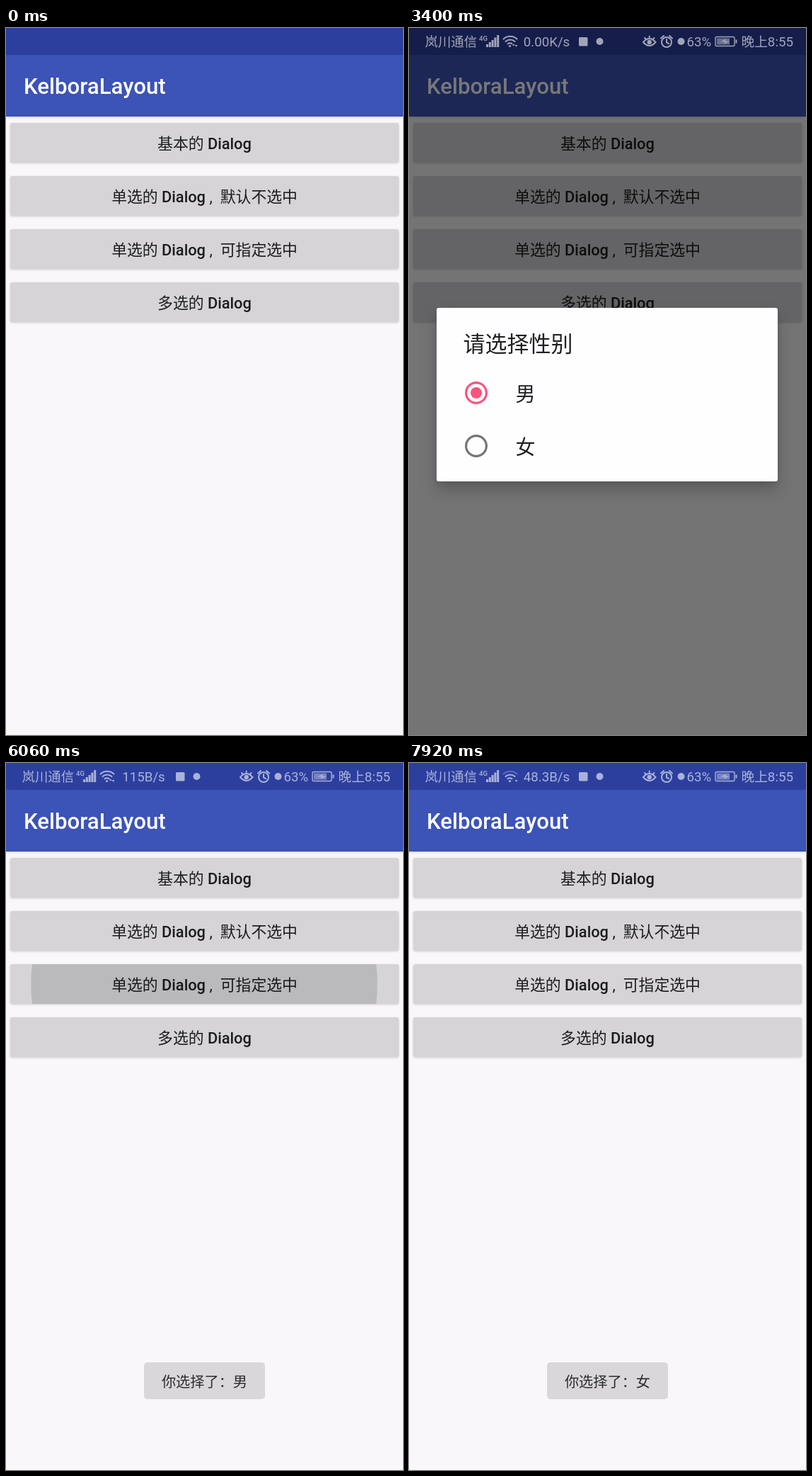
Animation of 561x998 px, one loop 8000 ms. Source, as an HTML page:

```html
<!DOCTYPE html>
<html lang="zh-CN">
<head>
<meta charset="utf-8">
<title>Dialog</title>
<style>
html, body { margin: 0; width: 100%; height: 100%; overflow: hidden; background: #f9f7fa; }
svg { display: block; width: 100%; height: 100%; }
text { font-family: Roboto, "Noto Sans CJK SC", "Noto Sans CJK", sans-serif; }
.medium { font-weight: 500; }
.mid { text-anchor: middle; }
#bar { filter: drop-shadow(0 1px 1.5px rgba(0,0,0,.18)); }
#buttons rect { fill: #d6d4d7; filter: drop-shadow(0 1px 1.5px rgba(0,0,0,.18)); }
#buttons text { font-size: 21.8px; fill: #1c1b1d; }
#panel { filter: drop-shadow(0 12px 11px rgba(0,0,0,.2)) drop-shadow(0 2px 3px rgba(0,0,0,.1)); }
#status { font-size: 18.7px; fill: #fff; }
.line { fill: none; stroke: #fff; stroke-width: 2; stroke-linecap: round; }
</style>
</head>
<body>
<svg viewBox="0 0 561 998">
  <defs>
    <clipPath id="buttonClip"><rect x="6" y="284" width="549" height="56" rx="3"/></clipPath>
    <clipPath id="rowClip"><rect id="row" x="39" width="482" height="75"/></clipPath>
  </defs>

  <rect width="561" height="998" fill="#f9f7fa"/>
  <rect id="bar" y="38" width="561" height="87" fill="#3c53b7"/>
  <rect width="561" height="38" fill="#2c3f9f"/>
  <text x="25" y="93" font-size="31.2" fill="#fff" class="medium">KelboraLayout</text>
  <g id="buttons"></g>
  <g clip-path="url(#buttonClip)"><circle id="buttonRipple" cx="280" cy="312"/></g>

  <rect id="dim" width="561" height="998"/>

  <g id="dialog">
    <rect id="panel" x="39" y="395" width="482" height="245" rx="3" fill="#fefdff"/>
    <g clip-path="url(#rowClip)"><circle id="rowRipple" opacity=".1"/></g>
    <g fill="#212121">
      <text x="76.5" y="456.5" font-size="31">请选择性别</text>
      <text x="150.5" y="526.5" font-size="28">男</text>
      <text x="150.5" y="601.5" font-size="28">女</text>
    </g>
    <g fill="none" stroke-width="3.2">
      <circle cx="95" cy="515" r="14.4" stroke="#f9547f"/>
      <circle cx="95" cy="590" r="14.4" stroke="#757575"/>
    </g>
    <circle cx="95" cy="515" r="8" fill="#f9547f"/>
  </g>

  <g id="toast">
    <rect x="195" y="846" width="171" height="52" rx="5" fill="#d8d6d9" opacity=".97"/>
    <text id="message" x="280.5" y="880.5" font-size="20.2" fill="#2a292b" class="mid"></text>
  </g>

  <g id="status">
    <text x="22.5" y="26" font-size="18.4">岚川通信</text>
    <text x="99" y="18" font-size="9.5" class="medium">4G</text>
    <path d="M109 23h3v4h-3zM112.8 20h3v7h-3zM116.6 17h3v10h-3zM120.4 13.5h3v13.5h-3zM124.2 10h3v17h-3z"/>
    <path id="outerArc" class="line" d="M133.5 15.5a14 14 0 0 1 19 0"/>
    <path class="line" d="M136.5 19a9.5 9.5 0 0 1 13 0M139.5 22.3a5 5 0 0 1 6 0"/>
    <circle cx="142.5" cy="25.5" r="1.6"/>
    <path id="arrowUp" d="M146 25l1.8-3 1.8 3z"/>
    <path d="M149.8 24h3.6l-1.8 3z"/>
    <text id="rate" x="194.5" y="26" class="mid"></text>
    <rect x="240" y="13" width="12.5" height="12.5" rx="1.5"/>
    <circle cx="269.5" cy="19" r="5"/>
    <path class="line" d="M331 20q8.5-10 17.5 0q-9 10-17.5 0zM333 14l1.5 1.5M339.7 11.5v1.5M346.5 14l-1.5 1.5"/>
    <circle cx="339.7" cy="20" r="3.2"/>
    <circle class="line" cx="364" cy="20" r="7"/>
    <path class="line" d="M364 16v4.5l3 1.5M356 14.5l4-3.5M372 14.5l-4-3.5"/>
    <circle cx="384.5" cy="19" r="5"/>
    <text x="392.5" y="26">63%</text>
    <rect class="line" x="433" y="12.5" width="27" height="13" rx="2" style="stroke-width:1.4"/>
    <path d="M461.5 16.5h2v5h-2z"/>
    <rect x="435" y="14.5" width="18" height="9" opacity=".6"/>
    <path d="M440 19.5l8-4-1 3h6l-8 4 1-3z"/>
    <text x="469.5" y="26">晚上8:55</text>
  </g>

  <circle id="touch" r="18" fill="#fff" stroke="#8c8ca5" stroke-opacity=".5"/>
</svg>
<script>
const LOOP = 8000;
const $ = id => document.getElementById(id);
const set = (id, attrs) => { for (const k in attrs) $(id).setAttribute(k, attrs[k]); };
const ramp = (t, start, length) => Math.min(1, Math.max(0, (t - start) / length));
const easeOut = p => 1 - (1 - p) ** 2;

const visits = [
  { press: 1280, open: 1690, tap: 3610, close: 3818, lift: 3760, x: 97, y: 516.5, row: 477.5 },
  { press: 5790, open: 6170, tap: 7217, close: 7425, lift: 7480, x: 95, y: 589, row: 552.5 }
];

$('buttons').innerHTML = [
  ['基本的', ''], ['单选的', ' ,&ensp;默认不选中'], ['单选的', ' ,&ensp;可指定选中'], ['多选的', '']
].map(([before, after], i) => `<rect x="6" y="${134 + 75 * i}" width="549" height="56" rx="3"/>
  <text class="mid" x="280.5" y="${170.5 + 75 * i}">${before} <tspan class="medium">Dialog</tspan>${after}</text>`).join('');

// The window drops quickly at first, then lingers.
function windowFade(ms) {
  if (ms < 62) return 1 - .69 * ramp(ms, 0, 62);
  if (ms < 125) return .31 - .155 * ramp(ms, 62, 63);
  return .155 * (1 - ramp(ms, 125, 95));
}

function draw(t) {
  const v = visits[t < 5000 ? 0 : 1];

  set('buttonRipple', {
    r: 280 * easeOut(ramp(t, v.press, 420)),
    opacity: .13 * ramp(t, v.press, 80) * (1 - ramp(t, v.open, 300))
  });
  set('dim', { opacity: .53 * ramp(t, v.open, 350) * (1 - ramp(t, v.close, 250)) });
  set('dialog', { opacity: easeOut(ramp(t, v.open, 300)) * windowFade(t - v.close) });

  const grow = ramp(t, v.tap, v.close - v.tap);
  set('row', { y: v.row });
  set('rowRipple', {
    cx: v.x + (280 - v.x) * easeOut(grow),
    cy: v.row + 37.5,
    r: 163 * grow
  });
  set('touch', {
    cx: v.x, cy: v.y,
    opacity: .4 * ramp(t, v.tap, 40) * (1 - ramp(t, v.lift, 195))
  });

  set('toast', { opacity: ramp(t, 3890, 190) - ramp(t, 7020, 380) + ramp(t, 7560, 190) });
  $('message').textContent = '你选择了：' + (t < 7500 ? '男' : '女');

  set('status', { opacity: .6 * ramp(t, 540, 140) });
  $('rate').textContent = t < 4250 ? '0.00K/s' : t < 7250 ? '115B/s' : '48.3B/s';
  set('outerArc', { opacity: t < 7700 ? 1 : .4 });
  set('arrowUp', { opacity: t < 7920 ? 1 : 0 });
}

const began = performance.now();
function tick() {
  draw((performance.now() - began) % LOOP);
  requestAnimationFrame(tick);
}
tick();
</script>
</body>
</html>
```
